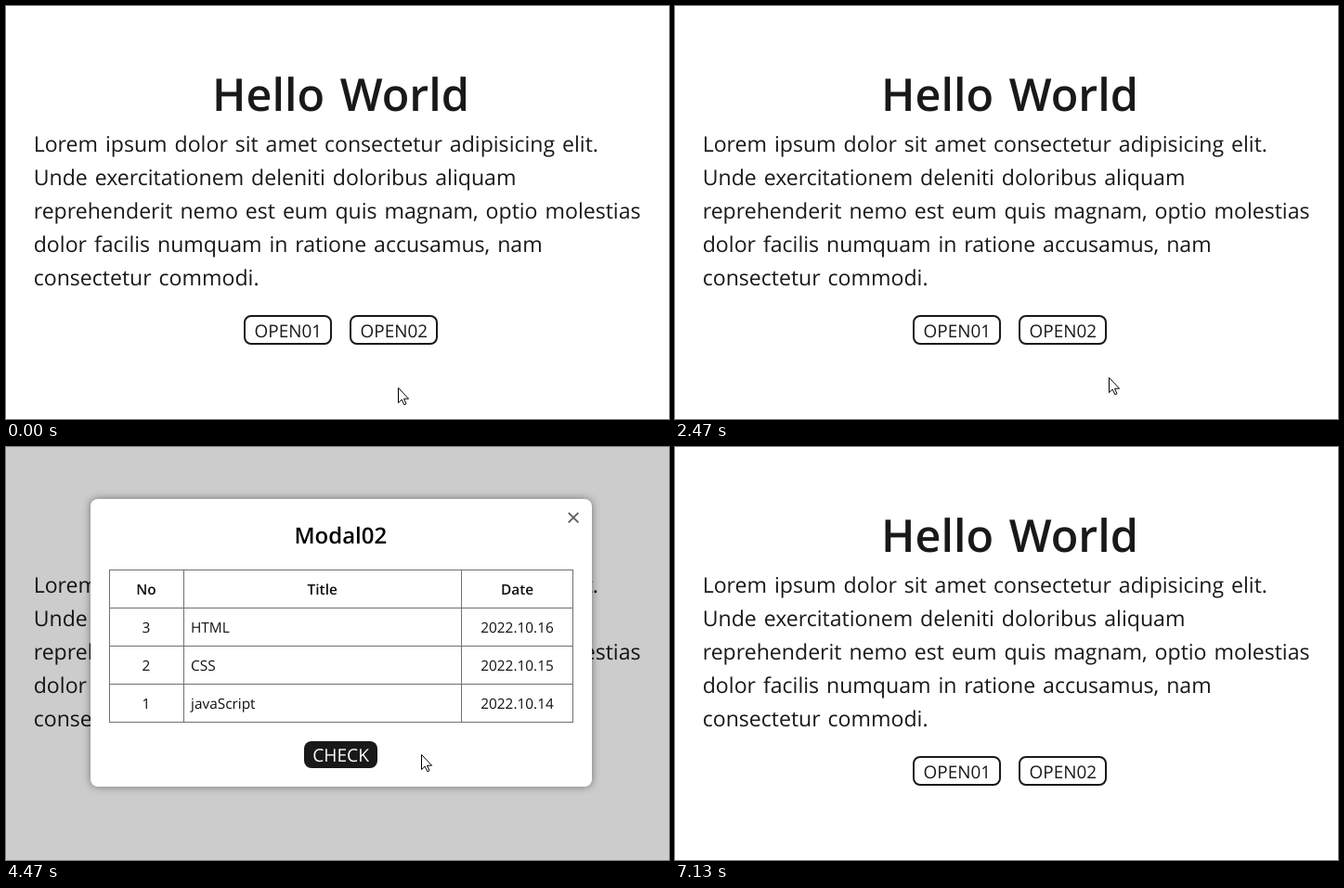
These frames come from a looping animation (714 px wide and 445 px high, 7470 ms). An HTML page:

```html
<!DOCTYPE html>
<html lang="en">
<head>
<meta charset="utf-8">
<title>Modal demo</title>
<style>
  html, body { margin: 0; width: 100%; height: 100%; overflow: hidden; background: #fff; }
  svg { display: block; width: 714px; height: 445px; font-family: "Open Sans", sans-serif; text-rendering: geometricPrecision; fill: #191919; }
  .bold { font-weight: 600; }
  .mid { text-anchor: middle; }
  .heading { font-size: 48.5px; word-spacing: 4px; }
  .lead { font-size: 23.1px; word-spacing: 1.9px; }
  .btn { fill: #fff; stroke: #191919; stroke-width: 2; }
  .label { font-size: 18.9px; }
  .panel { fill: #fff; filter: drop-shadow(0 0 4px rgba(0, 0, 0, .45)); }
  .grid { fill: none; stroke: #707070; }
  .table { font-size: 15.4px; fill: #111; }
  .close { stroke: #5c5c5c; stroke-width: 1.8; }
  #cursor path { fill: #fff; stroke: #000; stroke-linejoin: round; }
</style>
</head>
<body>
<svg viewBox="0 0 714 445">
  <text class="heading bold mid" x="360.5" y="113">Hello World</text>
  <g id="lead" class="lead"></g>
  <g id="buttons"></g>

  <g id="modal" visibility="hidden">
    <rect width="714" height="445" opacity=".2" fill="#000"/>
    <rect class="panel" x="91" y="56" width="540" height="310" rx="8"/>
    <path class="close" d="M605.8 70.8l10.6 10.6m0-10.6l-10.6 10.6"/>
    <text id="title" class="bold mid" x="360.3" y="104" font-size="24" fill="#000"></text>
    <path class="grid" d="M191.5 132.5v164M490.5 132.5v164"/>
    <g id="table" class="table"></g>
    <rect x="321" y="317" width="79" height="29" rx="8"/>
    <text class="mid" x="360.6" y="339" font-size="19.2" fill="#fff">CHECK</text>
  </g>

  <g id="cursor">
    <path id="arrow" d="M.5.5V16.6L4.2 13.1 6.8 18.7 9 17.7 6.5 12.2H11.6z"/>
    <path id="hand" d="M-.5 13V2a1.5 1.5 0 0 1 3 0V8a1.4 1.4 0 0 1 3 0v.6a1.4 1.4 0 0 1 2.6.4v.6a1.4 1.4 0 0 1 2.5.8V15c0 2-1.6 3-1.6 5v1.5H1V20C0 18-3 15-5 12.5c-1-1.6 1-2.9 2.3-1.4z"/>
  </g>
</svg>
<script>
  const LOOP = 7470, STEP = 200 / 3;
  const $ = id => document.getElementById(id);
  const text = (str, x, y, cls = "") => `<text x="${x}" y="${y}" class="${cls}">${str}</text>`;
  const show = (el, on) => el.setAttribute("visibility", on ? "visible" : "hidden");

  $("lead").innerHTML = [
    "Lorem ipsum dolor sit amet consectetur adipisicing elit.",
    "Unde exercitationem deleniti doloribus aliquam",
    "reprehenderit nemo est eum quis magnam, optio molestias",
    "dolor facilis numquam in ratione accusamus, nam",
    "consectetur commodi."
  ].map((line, i) => text(line, 29.7, 157 + 36 * i)).join("");

  $("buttons").innerHTML = ["OPEN01", "OPEN02"].map((name, i) => {
    const x = 257 + 114 * i;
    return `<rect class="btn" x="${x}" y="334" width="93" height="30" rx="7"/>` +
      text(name, x + 46.8, 357, "label mid");
  }).join("");

  $("table").innerHTML = ["Title", "HTML", "CSS", "javaScript"].map((name, i) => {
    const y = 159 + 41 * i, mid = i ? "mid" : "mid bold";
    return `<rect class="grid" x="111.5" y="${y - 26.5}" width="499" height="41"/>` +
      text(i ? 4 - i : "No", 151, y, mid) +
      text(name, i ? 199 : 340.7, y, i ? "" : mid) +
      text(i ? `2022.10.${17 - i}` : "Date", 550.5, y, mid);
  }).join("");

  // Pointer trips: first step, last step, destination
  const trips = [
    [0, 5, 312, 360], [7, 8, 309, 358], [22, 28, 467, 400],
    [37, 43, 314, 349], [44, 58, 615, 78],
    [58, 65, 439, 345], [66, 67, 447, 331], [67, 81, 613, 84],
    [84, 90, 424, 352], [91, 98, 599, 382], [102, 107, 612, 448]
  ];
  // Clicks by step, opening and closing in turn; each modal opens twice
  const clicks = [15, 37, 44, 58, 67, 84, 91, 102];

  function pointer(k) {
    let x = 422, y = 411;
    for (const [from, to, tx, ty] of trips) {
      const p = Math.min(1, Math.max(0, (k - from) / (to - from)));
      const e = Math.sin(p * Math.PI / 2);
      x += (tx - x) * e;
      y += (ty - y) * e;
    }
    return [Math.round(x), Math.round(y)];
  }

  const within = (x, y, cx, cy, w, h) => Math.abs(x - cx) < w / 2 && Math.abs(y - cy) < h / 2;
  const onPage = (x, y) => within(x, y, 303.5, 349, 95, 32) || within(x, y, 417.5, 349, 95, 32);
  const onModal = (x, y) => within(x, y, 611, 76, 20, 20) || within(x, y, 360.5, 331.5, 79, 29);

  function draw(now) {
    const k = Math.floor((now % LOOP + 4) / STEP);
    const done = clicks.filter(c => c <= k).length;
    const open = done % 2 === 1;
    const [x, y] = pointer(k);
    const over = open ? onModal(x, y) : onPage(x, y);
    show($("modal"), open);
    $("title").textContent = done < 4 ? "Modal01" : "Modal02";
    show($("hand"), over);
    show($("arrow"), !over);
    $("cursor").setAttribute("transform", `translate(${x} ${y})`);
  }

  let start;
  function tick(now) {
    start ??= now;
    draw(now - start);
    requestAnimationFrame(tick);
  }
  draw(0);
  requestAnimationFrame(tick);
</script>
</body>
</html>
```
